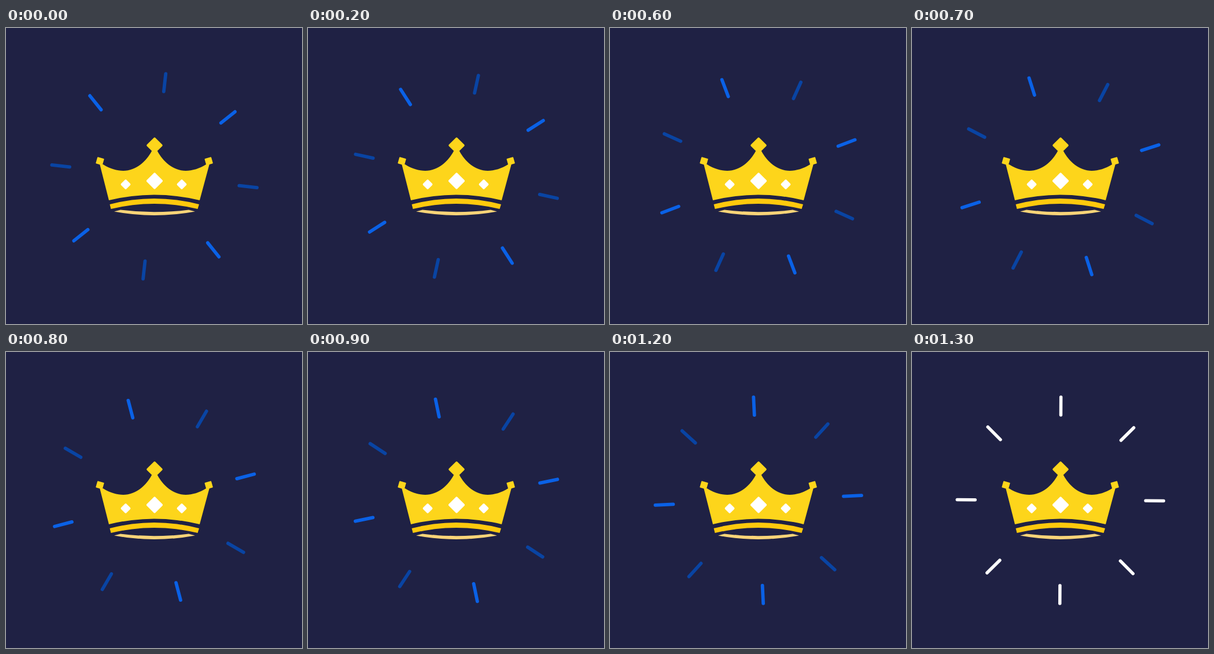
These frames come from a looping animation (512x512 px, 1500 ms). An HTML page:

```html
<!DOCTYPE html>
<html lang="en">
<head>
<meta charset="utf-8">
<title>Crown</title>
<style>
  html, body { margin: 0; height: 100%; overflow: hidden; background: #1f2144; }
  svg { display: block; width: 100vw; height: 100vh; }
</style>
</head>
<body>
<svg viewBox="0 0 512 512">
  <g id="rays" stroke-linecap="round"></g>
  <g fill="#fdd51b">
    <path d="M162 235L168 236C180 243.500 192 247 203 247C225 247 243 230 252 213H262C271 230 289 247 311 247C322 247 335 243 346 236L352 235L335 298Q257 279 178 298Z"/>
    <rect x="-10.250" y="-10.250" width="20.500" height="20.500" rx="2" transform="translate(257 203) rotate(45)"/>
    <rect x="-6" y="-5.800" width="12" height="11.600" rx="1" transform="translate(162.500 230.200) rotate(16)"/>
    <rect x="-6" y="-5.800" width="12" height="11.600" rx="1" transform="translate(350.700 230.200) rotate(-16)"/>
  </g>
  <path fill="#ffc90d" d="M179.500 305Q257 285 334 305L331.500 313Q257 295 181.500 313Z"/>
  <path fill="#f8d478" d="M187 317.500L198 314.500Q257 322 316 314.500L327 317.500Q257 330.500 187 317.500Z"/>
  <g fill="#fff">
    <rect x="-10.500" y="-10.500" width="21" height="21" rx="2" transform="translate(257 264.500) rotate(45)"/>
    <rect x="-6.500" y="-6.500" width="13" height="13" rx="2" transform="translate(207 270.500) rotate(45)"/>
    <rect x="-6.500" y="-6.500" width="13" height="13" rx="2" transform="translate(304 270.500) rotate(45)"/>
  </g>
</svg>
<script>
const LOOP = 1500, STEP = 100, LAST = 13;
const rays = document.getElementById('rays');

for (let i = 0; i < 8; i++) {
  const ray = document.createElementNS(rays.namespaceURI, 'path');
  ray.setAttribute('d', 'M0-147.500V-178.500');
  ray.setAttribute('transform', `rotate(${i * 45})`);
  rays.append(ray);
}

function draw(now) {
  const step = Math.min(LAST, Math.floor(now % LOOP / STEP));
  const flash = step === LAST;
  rays.setAttribute('transform', `translate(256.700 256.500) rotate(${6.3 + 3 * step})`);
  rays.setAttribute('stroke-width', flash ? 5.5 : 5.8);
  [...rays.children].forEach((ray, i) =>
    ray.setAttribute('stroke', flash ? '#fff' : i % 2 ? '#0a61e6' : '#0944a3'));
}

const start = performance.now();
function tick() {
  draw(performance.now() - start);
  requestAnimationFrame(tick);
}
tick();
</script>
</body>
</html>
```
